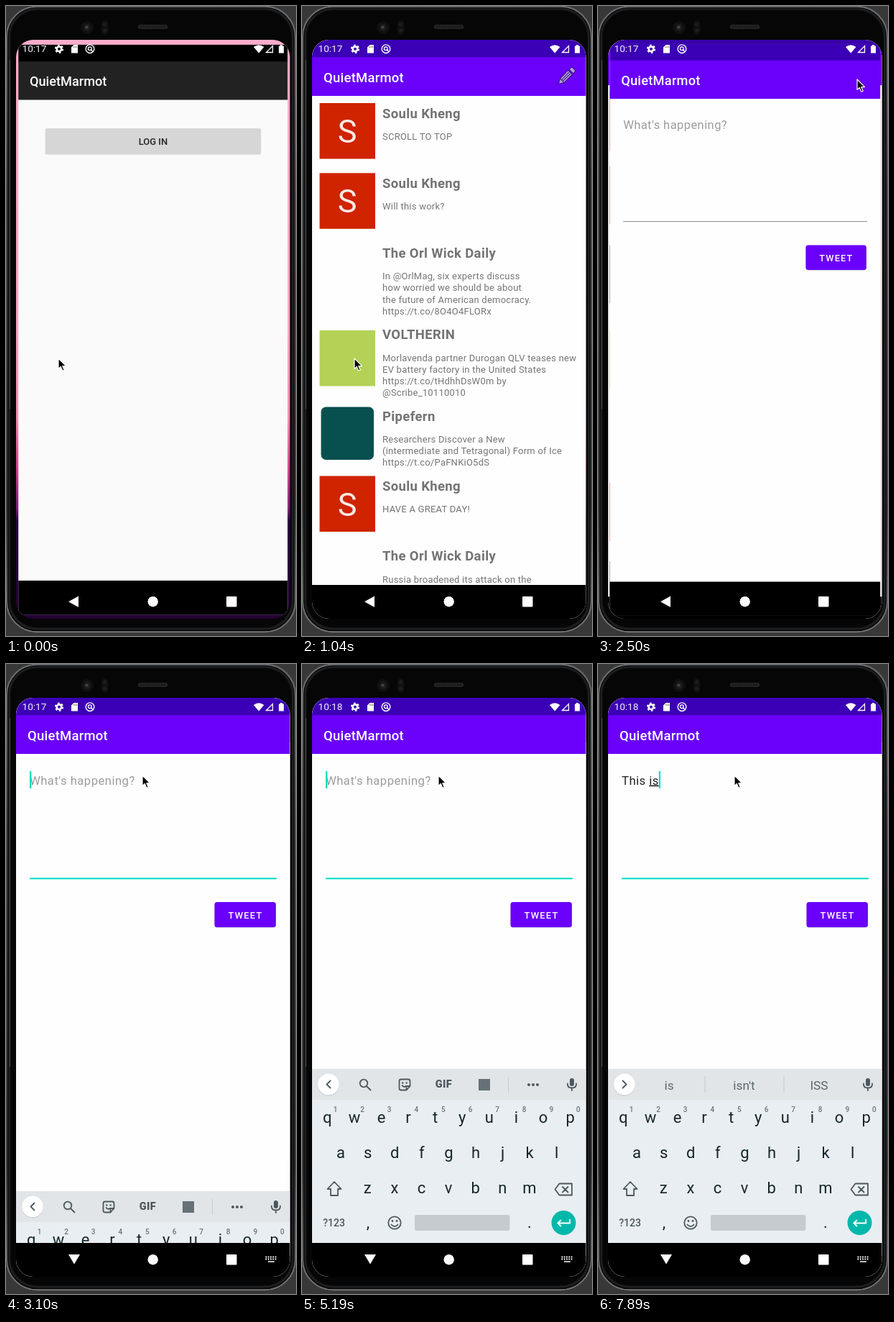
An HTML page that plays this animation: 404 px wide and 876 px high, repeating every 8000 ms.

```html
<!DOCTYPE html>
<html lang="en">
<head>
<meta charset="utf-8">
<title>Phone demo</title>
<style>
  html, body { margin: 0; width: 100%; height: 100%; overflow: hidden; background: #383838; }
  svg { display: block; width: 404px; height: 876px; }
  text { font-family: Roboto, "Noto Sans", sans-serif; white-space: pre; }
  .mid { text-anchor: middle; }
  .title { font-size: 18.5px; font-weight: 500; fill: #fff; }
  .name { font-size: 18.5px; font-weight: 700; fill: #737373; letter-spacing: .35px; }
  .post { font-size: 13px; fill: #757575; letter-spacing: .24px; }
  .field { font-size: 16.67px; letter-spacing: .46px; }
  .word { text-decoration: underline; text-decoration-skip-ink: none; }
  .key { font-size: 22px; fill: #14262c; text-anchor: middle; }
  .hint { font-size: 10px; font-weight: 500; fill: #6a757a; text-anchor: middle; }
  .pick { font-size: 17.3px; fill: #5b676c; text-anchor: middle; }
  .line { fill: none; stroke: #4b585d; stroke-width: 1.8; stroke-linejoin: round; stroke-linecap: round; }
  .ink { fill: #4b585d; }
</style>
</head>
<body>
<svg id="stage" viewBox="0 0 404 876" xmlns="http://www.w3.org/2000/svg"></svg>
<script>
const LOOP = 8000;
const APP = 'QuietMarmot', PERSON = 'Soulu Kheng', PAPER = 'The Orl Wick Daily';
const PURPLE = '#6a00fa', TEAL = '#00dcc4';

const rect = (x, y, w, h, fill, extra = '') =>
  `<rect x="${x}" y="${y}" width="${w}" height="${h}" fill="${fill}" ${extra}/>`;
const text = (x, y, cls, s, extra = '') => `<text x="${x}" y="${y}" class="${cls}" ${extra}>${s}</text>`;
const path = (d, extra = '') => `<path d="${d}" ${extra}/>`;
const circle = (x, y, r, fill, extra = '') => `<circle cx="${x}" cy="${y}" r="${r}" fill="${fill}" ${extra}/>`;
const group = (id, body, extra = '') => `<g id="${id}" ${extra}>${body}</g>`;

// An app window: status strip, title bar, page and navigation strip.
const appWindow = (id, status, bar, page, spacing, body) => group(id,
  rect(14, 47, 381.5, 806, page) + rect(14, 47, 381.5, 24.5, status) +
  rect(14, 71, 381.5, 54, bar) + text(30, 105.5, 'title', APP, `letter-spacing="${spacing}"`) +
  body + rect(14, 805, 381.5, 48, '#000'));

const SIZE = 77.5;
const letterAvatar = y => rect(24.5, y, SIZE, SIZE, '#d02300') +
  `<text x="63" y="${y + 55}" class="mid" font-size="45" fill="#fdeae5">S</text>`;
const plainAvatar = color => y => rect(24.5, y, SIZE, SIZE, color);
const insetAvatar = y => rect(26.5, y + 1, 73.5, 73.5, '#08504f', 'rx="7"');

const POSTS = [
  { y: 155.5, by: PERSON, avatar: letterAvatar, top: 135, lines: ['SCROLL TO TOP'] },
  { y: 252.8, by: PERSON, avatar: letterAvatar, top: 232.3, lines: ['Will this work?'] },
  { y: 350, by: PAPER, avatar: plainAvatar('#151515'), top: 337.5, late: true,
    lines: ['In @OrlMag, six experts discuss', 'how worried we should be about',
      'the future of American democracy.', 'https://t.co/8O4O4FLORx'] },
  { y: 463.4, by: 'VOLTHERIN', avatar: plainAvatar('#b3d256'), top: 451,
    lines: ['Morlavenda partner Durogan QLV teases new', 'EV battery factory in the United States',
      'https://t.co/tHdhhDsW0m by', '@Scribe_10110010'] },
  { y: 576.8, by: 'Pipefern', avatar: insetAvatar, top: 556.5,
    lines: ['Researchers Discover a New', '(intermediate and Tetragonal) Form of Ice',
      'https://t.co/PaFNKiO5dS'] },
  { y: 674, by: PERSON, avatar: letterAvatar, top: 653.5, lines: ['HAVE A GREAT DAY!'] },
  { y: 771.3, by: PAPER, avatar: plainAvatar('#151515'), top: 758, late: true,
    lines: ['Russia broadened its attack on the'] },
];

const pencil = `<g transform="translate(368 98) rotate(45)" stroke="#35107a" stroke-width="1" fill="#b6a0dc">` +
  path('M-4 -8H4V8L0 15L-4 8Z') + path('M-4 -10V-13Q-4 -15 -2 -15H2Q4 -15 4 -13V-10Z') +
  path('M-4 8H4M-1.2 -7V8M1.4 -7V8', 'fill="none"') + '</g>';

const login = appWindow('login', '#000', '#222', '#fafafa', 0,
  rect(52, 166, 306, 36.6, '#000', 'rx="2" opacity=".12"') +
  rect(52.6, 165.4, 304.8, 36, '#d6d6d6', 'rx="1.5"') +
  text(205, 188.3, 'mid', 'LOG IN', 'font-size="13.2" font-weight="500" fill="#222"'));

const feed = appWindow('feed', '#3b00b5', PURPLE, '#fefefe', .23, pencil +
  group('posts', POSTS.map(p => text(112, p.y, 'name', p.by) +
    p.lines.map((s, i) => text(112, p.y + 30.2 + i * 16.2, 'post', s)).join('')).join('')) +
  group('avatars', POSTS.filter(p => !p.late).map(p => p.avatar(p.top)).join('')) +
  group('lateAvatars', POSTS.filter(p => p.late).map(p => p.avatar(p.top)).join('')));

const compose = appWindow('compose', '#3b00b5', PURPLE, '#fefefe', .23,
  text(33, 167.5, 'field', "What's happening?", 'id="prompt" fill="#9c9c9c"') +
  text(33, 167.5, 'field', '', 'id="typed" fill="#222"') +
  rect(33, 149, 2.2, 24, TEAL, 'id="caret"') +
  rect(33, 297.3, 344, 1, '#858585', 'id="underline"') +
  rect(290.5, 332, 85.5, 35, '#000', 'rx="4" opacity=".15"') +
  rect(290.5, 331, 85.5, 35, PURPLE, 'rx="3.5"') +
  text(333.5, 353.5, 'mid', 'TWEET', 'font-size="13" font-weight="500" letter-spacing="1.16" fill="#fff"'));

const keyRow = (letters, x, y) => [...letters].map((c, i) => text(x + 37.6 * i, y, 'key', c)).join('');
const keyboard = group('keyboard',
  rect(14, 563, 381.5, 43, '#e1e5e8') + rect(14, 606, 381.5, 200, '#e9eef2') +
  circle(37, 585.5, 15, '#000', 'opacity=".12"') + circle(37, 584.5, 14.8, '#fff') +
  path('', 'id="chevron" class="line"') +
  group('tools',
    circle(86, 583, 5.3, 'none', 'class="line"') + path('M90 587L95.500 592.500', 'class="line"') +
    path('M138 577.500H148Q150.500 577.500 150.500 580V587L145.500 592.500H138Q135.500 592.500 135.500 590V580Q135.500 577.500 138 577.500ZM145.500 592V587H150M139.500 586Q142 589 144.500 587', 'class="line"') +
    circle(140.3, 582.5, 1.2, '#4b585d') + circle(145.6, 582.5, 1.2, '#4b585d') +
    text(197.5, 589, 'mid ink', 'GIF', 'font-size="14.5" font-weight="900" letter-spacing=".4"') +
    rect(246, 577, 16, 16, '#657176') + rect(287, 574, 1, 22, '#c5cbcf') +
    [316, 322, 328].map(x => circle(x, 585, 2, '#4b585d')).join('')) +
  group('picks', rect(148.500, 573, 1, 23, '#c5cbcf') + rect(258.500, 573, 1, 23, '#c5cbcf') +
    [99, 203.5, 308].map(x => text(x, 591.8, 'pick', '')).join('')) +
  rect(373, 576, 6, 11, '#4b585d', 'rx="3"') +
  path('M370 583.500V584.500Q370 589.500 376 589.500T382 584.500V583.500M376 590V593', 'class="line"') +
  keyRow('qwertyuiop', 35.3, 638) +
  [...'1234567890'].map((c, i) => text(46.5 + 37.6 * i, 622.5, 'hint', c)).join('') +
  keyRow('asdfghjkl', 54, 687) + keyRow('zxcvbnm', 91.3, 736.3) +
  path('M45 720L54.500 730H50V739H40V730H35.500Z', 'class="line"') +
  path('M352.500 730.500L358.500 722.500H376V738.500H358.500ZM363 727L370.500 734.500M370.500 727L363 734.500', 'class="line"') +
  text(44.5, 782, 'mid ink', '?123', 'font-size="14" font-weight="500"') +
  text(92, 783.5, 'key', ',') + text(317, 783.5, 'key', '.') +
  circle(129, 777, 8.7, 'none', 'class="line"') + circle(126, 774.5, 1.4, '#4b585d') +
  circle(132, 774.5, 1.4, '#4b585d') + path('M124.500 779.500Q129 784.500 133.500 779.500', 'class="line"') +
  rect(157, 766, 132.500, 22, '#c6cbd0', 'rx="3"') +
  circle(364.5, 777, 17, '#00b8aa') +
  path('M373 772V777.500H357M361 773L356.500 777.500L361 782', 'fill="none" stroke="#fff" stroke-width="2"'));

const statusIcons = group('statusIcons',
  text(22.5, 64.3, '', '', 'id="clock" font-size="13.6" fill="#f2f0f8"') +
  circle(74, 59.7, 3.3, 'none', 'stroke="#fff" stroke-width="2.6"') +
  circle(74, 59.7, 5.2, 'none', 'stroke="#fff" stroke-width="2" stroke-dasharray="2.700 2.745"') +
  path('M94.500 54H100V65.500H91V57.500Z', 'fill="#fff"') +
  path('M94.500 56V58M96.500 56V58M98.500 56V58', 'stroke="#555" stroke-width=".8"') +
  circle(117, 59.7, 5.8, 'none', 'stroke="#fff" stroke-width="1.4"') +
  circle(116.8, 59.2, 2.4, 'none', 'stroke="#fff" stroke-width="1.3"') +
  path('M118 60.500L121 63.500', 'stroke="#fff" stroke-width="1.500"') +
  path('M345 57Q352 51.500 359.500 57L352.200 65.500Z', 'fill="#fff"') +
  path('M371.500 55.500V64.500H362.500Z', 'fill="none" stroke="#fff" stroke-width="1.300"') +
  path('M380 55.500H382V54H385V55.500H387V65.500H380Z', 'fill="#fff"'));

const navIcons = group('navIcons',
  path('', 'id="back"') + circle(204.7, 828.2, 7.2, '#fff') + rect(307, 821, 14.5, 14.5, '#fff', 'rx="1"') +
  group('imeIcon', [824.5, 827.5].map(y => path(`M361.500 ${y}H377`,
    'stroke="#fff" stroke-width="1.800" stroke-dasharray="1.800 1.500"')).join('') +
    path('M365 831H374', 'stroke="#fff" stroke-width="1.600"')), 'fill="#fff"');

const phone = rect(0, 0, 404, 876, '#383838') +
  rect(1, .7, 402, 869.500, '#070708', 'rx="42" stroke="url(#rim)" stroke-width="2"') +
  rect(4.5, 4, 395, 862, 'none', 'rx="39" stroke="#1d1e1f" stroke-width="3"') +
  rect(8, 7, 388, 855, '#060607', 'rx="36"') +
  path('M5.500 75V560', 'stroke="#55585a" stroke-width="1.200" opacity=".7"') +
  circle(113, 30, 9, '#101011') + circle(113, 30, 5, '#1c1d1f') + circle(112.5, 29.5, 2, '#45474a') +
  rect(133, 20, 9.500, 20, '#0f0f10', 'rx="4.500"') + circle(137.7, 25.5, 3, '#1b1b1c') + circle(137.7, 34, 3, '#1b1b1c') +
  rect(184, 26, 41, 6, '#262627', 'rx="2.500"') +
  path('M186 29H223', 'stroke="#111" stroke-width="4" stroke-dasharray="1 1.500"');

const stop = (at, color) => `<stop offset="${at}" stop-color="${color}"/>`;
const stage = document.getElementById('stage');
stage.innerHTML = `<defs>
  <linearGradient id="rim" x2="0" y2="1">${stop(0, '#6e7072') + stop(.3, '#4a4b4c') + stop(.8, '#3c3d3e') + stop(1, '#777')}</linearGradient>
  <linearGradient id="wall" x2="0" y2="1">${stop(0, '#ffaccb') + stop(.5, '#ffa3bd') + stop(.65, '#f98bb0') +
    stop(.74, '#d83e8a') + stop(.81, '#7a1d78') + stop(.83, '#23053f') + stop(1, '#240333')}</linearGradient>
  <clipPath id="screen"><rect x="14" y="47" width="381.500" height="805" rx="24"/></clipPath>
  <clipPath id="aboveNav"><rect x="14" y="47" width="381.500" height="758"/></clipPath></defs>` + phone +
  `<g clip-path="url(#screen)">` + rect(14, 47, 382, 806, 'url(#wall)') + login + feed +
  rect(14, 47, 382, 806, '#000', 'id="dim"') + compose +
  `<g clip-path="url(#aboveNav)">${keyboard}</g>` + statusIcons + navIcons + '</g>' +
  group('mouse', path('M0 0V14.500L3.300 11.500L5.800 17.200L8.200 16.200L5.800 10.600H10.500Z',
    'fill="#000" stroke="#fff" stroke-width="1.200" stroke-linejoin="round"'));

const ui = {};
stage.querySelectorAll('[id]').forEach(el => ui[el.id] = el);
// Keep the shade between the outgoing and incoming windows.
const placeDim = under => { if (under.nextSibling !== ui.dim) under.after(ui.dim); };

const TICKS = [0, 150, 300, 450, 600, 740, 890, 1040, 1190, 1330, 1480, 1620, 1770, 1910,
  2350, 2500, 2650, 2800, 3100, 3250, 3390].map(t => [t]);
const MOUSE = [[0, 73, 490], [1330, 112, 425], [1480, 226, 262], [1620, 322, 140],
  [1770, 360, 91], [1910, 361, 102], [2650, 270, 128], [2800, 190, 155]];
const SLIDE = [[0, 260], [3100, 170], [3250, 28], [3390, 0]];
const THIS = ['This', "This'll", 'Thistle'];
const TYPING = [[0, '', null], [5640, 'T', ['T', 'To', 'Thanks']], [5790, 'Th', ['T', 'To', 'Thanks']],
  [5940, 'Th', ['Th', 'The', 'Thanks']], [6390, 'Thi', ['Thi', 'This', 'Think']],
  [6540, 'This', THIS], [6690, 'This ', THIS], [6840, 'This ', ['is', 'will', 'weekend']],
  [7740, 'This i', ['I', 'is', 'in']], [7890, 'This is', ['is', "isn't", 'ISS']]];
const CARET_OFF = [[3690, 4140], [4740, 5190], [7290, 7740]];

const latest = (list, t) => list.filter(e => e[0] <= t).pop();
const show = (el, on) => el.style.display = on ? '' : 'none';
const zoom = (el, s) => el.setAttribute('transform', `translate(205 449.500) scale(${s}) translate(-205 -449.500)`);

const opening = (t, start) => t < start ? 0 : t - start > 430 ? 1 : 1 - Math.exp((start - t) / 145);
const openWindow = (el, t, start) => {
  const p = opening(t, start);
  show(el, p > 0);
  zoom(el, .85 + .15 * p);
  el.setAttribute('opacity', Math.min(1, Math.max(0, (t - start) / 120)));
  return p;
};

function drawTyping(t) {
  const [, typed, picks] = latest(TYPING, t);
  const cut = typed.lastIndexOf(' ') + 1;
  ui.typed.innerHTML = typed.slice(0, cut) + `<tspan class="word">${typed.slice(cut)}</tspan>`;
  show(ui.prompt, !typed);
  const end = typed ? 33 + ui.typed.getComputedTextLength() : 33;
  ui.caret.setAttribute('x', end);
  show(ui.caret, t >= 3100 && !CARET_OFF.some(([a, b]) => t >= a && t < b));
  show(ui.tools, !picks);
  show(ui.picks, picks);
  if (picks) ui.picks.querySelectorAll('text').forEach((el, i) => el.textContent = picks[i]);
  ui.chevron.setAttribute('d', picks ? 'M34.500 579.500L39.500 584.500L34.500 589.500' : 'M39.500 579.500L34.500 584.500L39.500 589.500');
}

function draw(t) {
  const step = latest(TICKS, t)[0];
  openWindow(ui.login, step, -316);
  const feedIn = openWindow(ui.feed, step, 250);
  const composeIn = openWindow(ui.compose, step, 2140);
  if (feedIn > 0 && feedIn < 1) zoom(ui.login, 1 + .05 * feedIn);
  if (composeIn > 0) zoom(ui.feed, 1 + .05 * composeIn);
  placeDim(composeIn > 0 ? ui.feed : ui.login);
  ui.dim.setAttribute('opacity', feedIn > 0 ? .07 : 0);

  show(ui.posts, t >= 890);
  show(ui.avatars, t >= 1040);
  show(ui.lateAvatars, t >= 1190);

  const focused = t >= 3100;
  ui.underline.setAttribute('fill', focused ? TEAL : '#858585');
  ui.underline.setAttribute('height', focused ? 2 : 1);
  show(ui.keyboard, focused);
  show(ui.imeIcon, focused);
  ui.keyboard.setAttribute('transform', `translate(0 ${latest(SLIDE, t)[1]})`);
  ui.back.setAttribute('d', focused ? 'M87 821H103L95 834.500Z' : 'M87 828.200L101 820.500V836Z');
  ui.clock.textContent = t < 3840 ? '10:17' : '10:18';
  drawTyping(t);

  const [, x, y] = latest(MOUSE, t);
  ui.mouse.setAttribute('transform', `translate(${x} ${y})`);
}

const begin = performance.now();
function tick() {
  draw((performance.now() - begin) % LOOP);
  requestAnimationFrame(tick);
}
tick();
</script>
</body>
</html>
```
